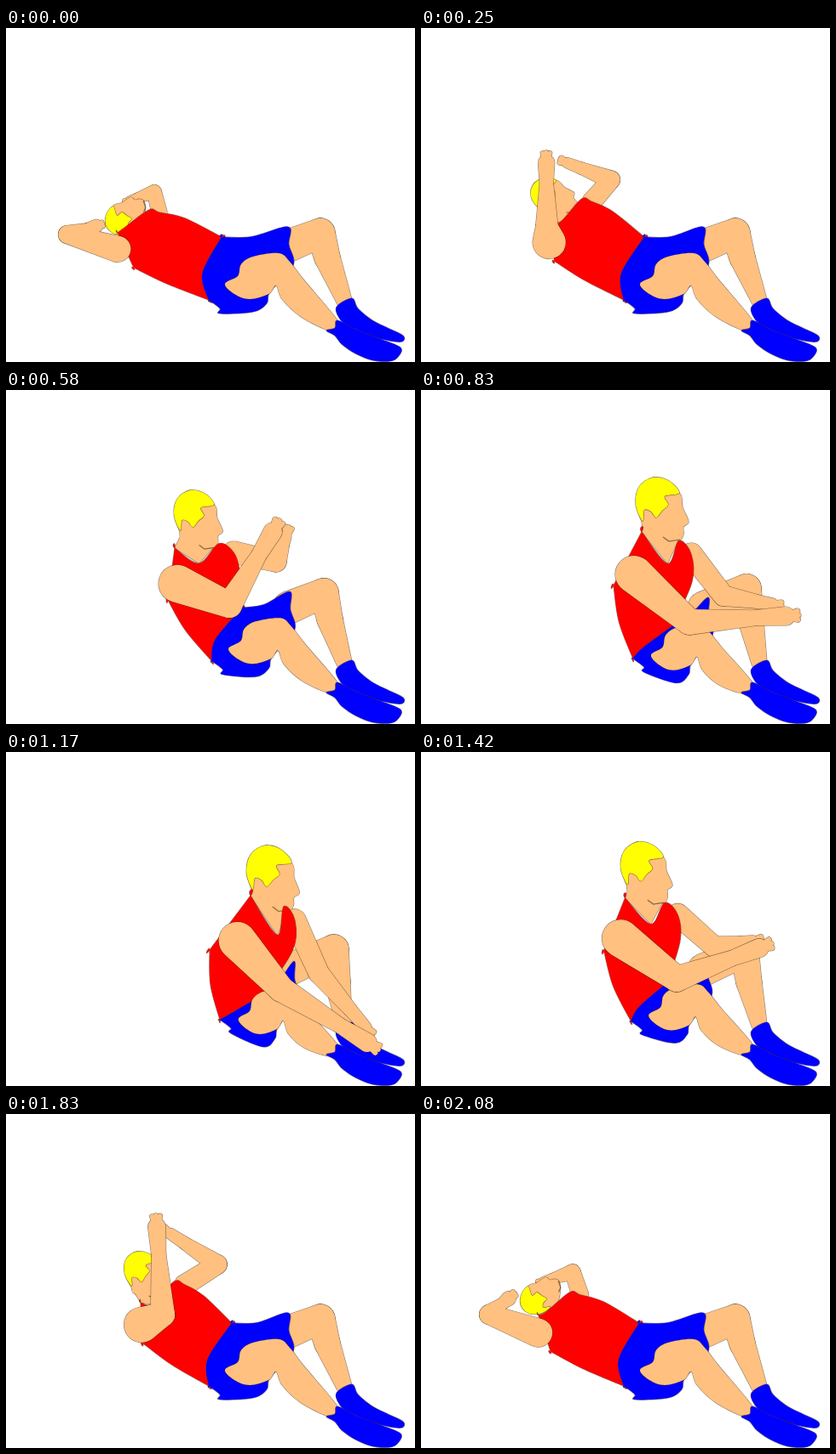
Recreate the animation shown at these times as an HTML page with a canvas. Size 480 px wide and 393 px high, loop 2160 ms.

```html
<!DOCTYPE html>
<html lang="en">
<head>
<meta charset="utf-8">
<title>Sit-up</title>
<style>
html, body { margin: 0; width: 100%; height: 100%; overflow: hidden; background: #fff; }
canvas { display: block; }
</style>
</head>
<body>
<canvas id="stage" width="480" height="393"></canvas>
<script>
const LOOP = 2160, STEP = 250 / 3, STEPS = 26;
const SKIN = '#ffc080', RED = '#f00', BLUE = '#00f', YELLOW = '#ff0', LINE = 'rgba(60,40,20,.6)';
const ctx = document.getElementById('stage').getContext('2d');

// Waypoints by phase: 0 is lying down, 13 is fully up
const armpit = { 0: [150, 282], 4: [161, 270], 7: [190, 247], 10: [226, 230], 12: [239, 233] };
const collar = { 0: [131, 241], 4: [158, 222], 5: [164, 205], 7: [198, 186], 10: [259, 167], 12: [287, 169] };
const farShoulder = { 0: [180, 217], 4: [210, 201], 5: [235, 203], 7: [267, 191], 10: [317, 193], 12: [339, 198] };
const nearElbow = { 0: [72, 243], 1: [80, 236], 4: [184, 236], 5: [220, 239], 7: [262, 253], 10: [315, 273], 12: [323, 279] };
const nearHand = { 0: [106, 233], 1: [103, 217], 4: [177, 133], 5: [235, 133], 7: [313, 167], 10: [428, 266], 12: [424, 342] };
const farElbow = { 0: [174, 193], 1: [178, 186], 4: [248, 177], 5: [277, 185], 7: [317, 202], 10: [355, 242], 12: [367, 260] };
const farHand = { 0: [145, 203], 1: [144, 197], 4: [193, 141], 5: [247, 138], 7: [328, 172], 10: [412, 252], 12: [422, 324] };
// x, y, scale, turn in degrees
const headPath = {
  0: [134, 224, .66, -100], 1: [134, 217, .66, -100], 4: [160, 182, .76, -8], 5: [182, 165, .87, 0],
  7: [223, 143, .92, 0], 10: [280, 130, 1, 0], 12: [311, 138, 1.02, 3]
};

const points = text => text.split(' ').map(p => p.split(',').map(Number));
const face = points('-21,25 -27,0 -8,-27 23,-9 27,8 34,25 28,31 28,40 23,47 5,46 -18,36');
const hair = points('-20,24 -28,5 -24,-16 -8,-27 11,-23 23,-9 6,-5 10,5 3,12 -4,20 -10,13 -18,11');
const jaw = points('4,43 11,48 24,46');
const leg = points('257,301 272,292 276,278 290,269 320,265 333,275 350,297 389,344 386,353 376,355 345,339 324,319 317,303 308,313 286,319 268,313');
const seat = points('331,234 332,255 337,280 310,310 306,324 290,334');
const nearSock = points('389,344 411,355 437,365 463,376 460,387 451,392 430,391 410,383 394,372 386,362 376,356 386,353');
const farSock = points('388,328 406,318 413,330 430,344 448,353 466,362 465,369 450,368 428,362 401,350 391,341');

const mix = (a, b, t) => a.map((v, i) => v + (b[i] - v) * t);
const shift = ([x, y], dx, dy) => [x + dx, y + dy];
const clamp = t => Math.min(1, Math.max(0, t));
const smooth = t => t * t * (3 - 2 * t);

// Smooth passage through the waypoints, coasting after the last one
function follow(path, u) {
  const t = Object.keys(path).map(Number), last = t.length - 1;
  const slope = (i, c) => {
    const a = t[Math.max(i - 1, 0)], b = t[Math.min(i + 1, last)];
    return (path[b][c] - path[a][c]) / (b - a);
  };
  if (u >= t[last]) return path[t[last]].map((v, c) => v + slope(last, c) * (u - t[last]) / 2);
  const i = t.findIndex(k => k > u) - 1, h = t[i + 1] - t[i], s = (u - t[i]) / h, r = 1 - s;
  return path[t[i]].map((v, c) =>
    r * r * ((1 + 2 * s) * v + s * h * slope(i, c)) +
    s * s * ((1 + 2 * r) * path[t[i + 1]][c] - r * h * slope(i + 1, c)));
}

// Closed smooth curve; a point listed twice makes a corner
function blob(p) {
  const path = new Path2D(), n = p.length, at = i => p[(i + n) % n];
  const handle = (i, sign) => at(i).map((v, c) => v + sign * (at(i + 1)[c] - at(i - 1)[c]) / 6);
  path.moveTo(...p[0]);
  p.forEach((_, i) => path.bezierCurveTo(...handle(i, 1), ...handle(i + 1, -1), ...at(i + 1)));
  return path;
}

function polygon(p) {
  const path = new Path2D();
  p.forEach(q => path.lineTo(...q));
  path.closePath();
  return path;
}

function capsule(a, ra, b, rb) {
  const path = new Path2D(), dx = b[0] - a[0], dy = b[1] - a[1];
  const dir = Math.atan2(dy, dx), d = Math.hypot(dx, dy);
  const open = Math.acos(Math.max(-1, Math.min(1, (ra - rb) / (d || 1))));
  path.arc(...a, ra, dir + open, dir - open + 2 * Math.PI);
  path.arc(...b, rb, dir - open, dir + open);
  path.closePath();
  return path;
}

const chain = (joints, radii) =>
  joints.slice(1).map((b, i) => capsule(joints[i], radii[i], b, radii[i + 1]));

// Fills the union of the shapes with one outline around it
function paint(color, shapes, line = LINE) {
  ctx.strokeStyle = line;
  ctx.lineWidth = 1.2;
  ctx.fillStyle = color;
  shapes.forEach(s => ctx.stroke(s));
  shapes.forEach(s => ctx.fill(s));
}

function arm(shoulder, elbow, hand, radii, size) {
  const wrist = mix(elbow, hand, .68);
  const r = radii.map(v => v * size);
  const dir = Math.atan2(hand[1] - wrist[1], hand[0] - wrist[0]);
  const fingers = [-.35, 0, .35].map(turn => {
    const reach = (r[3] + 4) * size;
    const tip = shift(hand, reach * Math.cos(dir + turn), reach * Math.sin(dir + turn));
    return capsule(hand, 4 * size, tip, 3 * size);
  });
  paint(SKIN, [...chain([shoulder, elbow, wrist, hand], r), ...fingers]);
}

function drawFigure(u) {
  const bend = smooth(clamp((u - 4.5) / 7.5));
  const size = Math.min(1, .7 + .06 * u);
  // The near leg swings about its ankle
  const swing = ([x, y]) => [x + .12 * bend * (388 - x), y + 13 * bend * clamp((388 - x) / 60)];

  const waist = [253 + 3 * u + 14 * bend, 246 + 39 * bend];
  const tail = [238 + 13 * bend, 320 - 5 * bend];
  const belt = shift(mix(waist, tail, .5), 5 * bend - 15, 6);
  const pit = follow(armpit, u), neck = follow(collar, u), far = follow(farShoulder, u);
  const strap = shift(mix(neck, far, .75), 0, -9);
  const throat = shift(mix(neck, strap, .2 + .05 * u), 0, 3 * u);
  const chest = shift(mix(far, waist, .4), 12 * bend, -5 * (1 - bend));
  const back = shift(mix(pit, tail, .5), -5, 0);
  const shoulder = shift(pit, 4.3 * u - 19, 11 * bend - 22);

  const [hx, hy, scale, degrees] = follow(headPath, u);
  const turn = degrees * Math.PI / 180, cos = scale * Math.cos(turn), sin = scale * Math.sin(turn);
  const onHead = ([x, y]) => [hx + x * cos - y * sin, hy + x * sin + y * cos];

  ctx.clearRect(0, 0, 480, 393);

  const knee = [369 + 16 * bend, 241 - 9 * bend], calf = [377 + 12 * bend, 270];
  paint(SKIN, chain([[332, 256], knee, calf, [397, 321]], [19, 17, 15, 9]));
  paint(BLUE, [blob(farSock)]);
  arm(far, follow(farElbow, u), follow(farHand, u), [13, 12, 8, 7], size);

  const nape = onHead([-19, 30]), chin = onHead([22, 46]);
  paint(SKIN, [blob(face.map(onHead)), polygon([nape, neck, throat, chin])]);
  paint(YELLOW, [blob(hair.map(onHead))]);
  ctx.beginPath();
  jaw.map(onHead).forEach(p => ctx.lineTo(...p));
  ctx.strokeStyle = LINE;
  ctx.stroke();

  paint(RED, [blob([pit, pit, neck, neck, throat, strap, far, chest, waist, waist, belt, tail, tail, back])]);
  paint(BLUE, [blob([
    waist, waist, shift(mix(waist, swing(seat[0]), .45), 0, 5), ...seat.map(swing),
    shift(tail, 13, 16), shift(tail, 13, 10), tail, tail, belt
  ])]);
  paint(SKIN, [blob(leg.map(swing))]);
  paint(BLUE, [blob(nearSock)]);
  arm(shoulder, follow(nearElbow, u), follow(nearHand, u), [22, 15, 9, 11], size);
}

let shown = -1;
function tick(now) {
  const step = Math.floor((now % LOOP + 5) / STEP);
  if (step !== shown) {
    shown = step;
    drawFigure(Math.min(step, STEPS - step));
  }
  requestAnimationFrame(tick);
}
tick(0);
</script>
</body>
</html>
```
